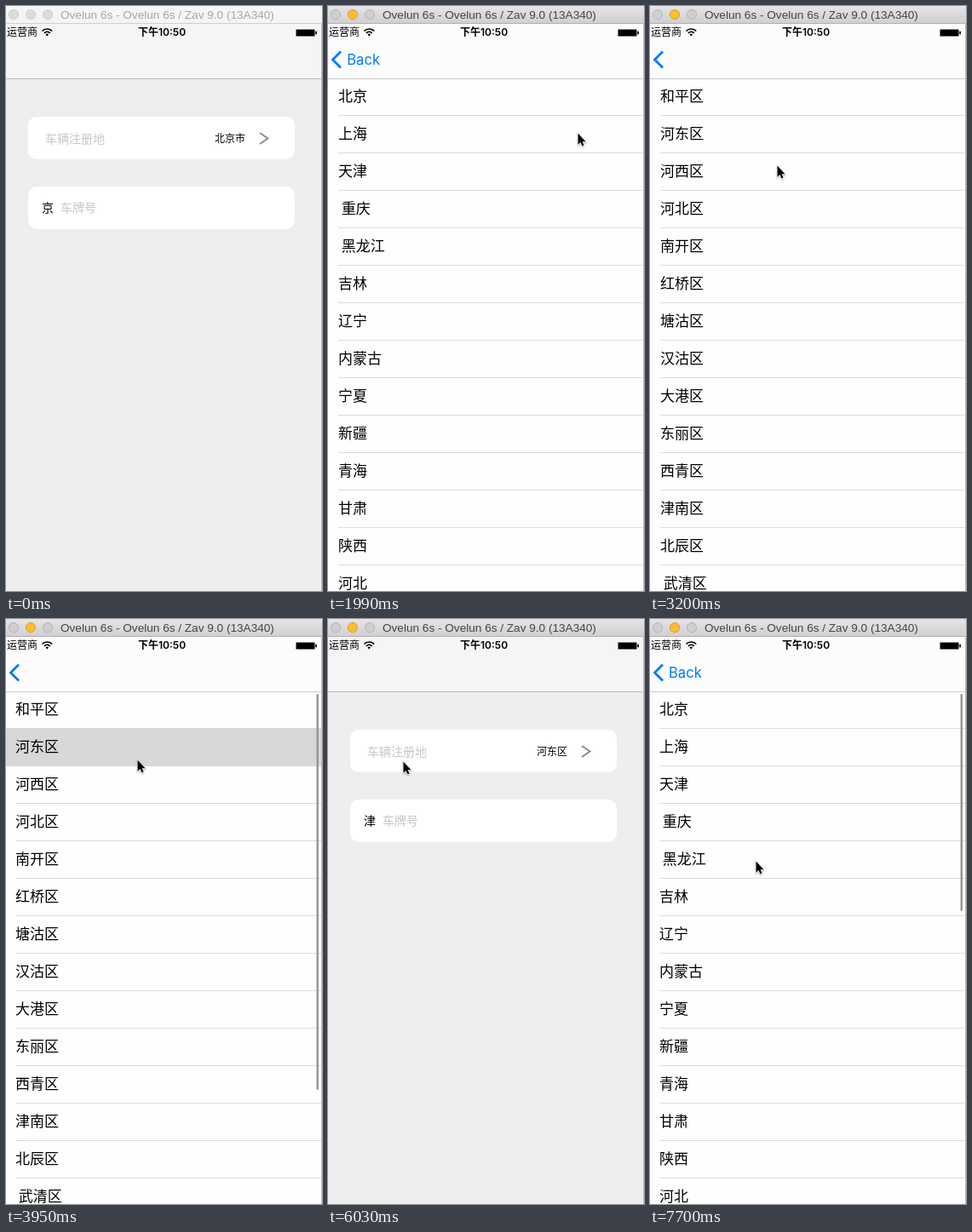
An HTML page with a canvas that plays this animation: 371x687 px, repeating every 8 s.

```html
<!DOCTYPE html>
<html lang="zh">
<head>
<meta charset="utf-8">
<style>
html, body { margin: 0; width: 100%; height: 100%; overflow: hidden; background: #eee; }
canvas { display: block; }
</style>
</head>
<body>
<canvas id="stage" width="371" height="687"></canvas>
<script>
const ctx = document.getElementById('stage').getContext('2d');
const W = 371, H = 687, LOOP = 8000;
const SCREEN_X = -4, SCREEN_W = 375, BAR_BOTTOM = 85, ROW = 44;
const BLUE = '#007aff';
const CJK = '"Noto Sans CJK SC", "Noto Sans CJK", sans-serif';
const UI = 'Inter, ' + CJK;

const provinces = ['北京', '上海', '天津', ' 重庆', ' 黑龙江', '吉林', '辽宁', '内蒙古',
  '宁夏', '新疆', '青海', '甘肃', '陕西', '河北'];
const districts = ['和平区', '河东区', '河西区', '河北区', '南开区', '红桥区', '塘沽区', '汉沽区',
  '大港区', '东丽区', '西青区', '津南区', '北辰区', ' 武清区'];

// Start times of the four navigation transitions
const OPEN = 1524, DRILL = 2757, POP = 3948, REOPEN = 6862;

// Pointer path: time, x, y
const pointer = [
  [540, 368, 139], [880, 293, 149], [2000, 293, 149], [2450, 145, 202], [2870, 145, 202],
  [3540, 154, 171], [3660, 154, 165], [4300, 154, 165], [4750, 89, 183], [5150, 60, 220],
  [5500, 34, 258], [5610, 28, 257], [6030, 88, 167], [6380, 221, 157], [6550, 256, 156],
  [7050, 256, 156], [7650, 123, 285], [7700, 124, 284]
];

const ramp = (t, a, b) => Math.min(1, Math.max(0, (t - a) / (b - a)));

// Critically damped spring from 0 to 1
function spring(ms) {
  const u = Math.max(0, ms) * 0.01826;
  return 1 - (1 + u) * Math.exp(-u);
}

function rect(x, y, w, h, color) {
  ctx.fillStyle = color;
  ctx.fillRect(x, y, w, h);
}

function roundRect(x, y, w, h, r, color) {
  ctx.fillStyle = color;
  ctx.beginPath();
  ctx.roundRect(x, y, w, h, r);
  ctx.fill();
}

// y is the visual middle of the line
function text(str, x, y, size, color = '#000', family = CJK, weight = 400) {
  ctx.font = `${weight} ${size}px ${family}`;
  ctx.fillStyle = color;
  ctx.fillText(str, x, Math.round(y + size * 0.37));
}

function polyline(points, color, width) {
  ctx.strokeStyle = color;
  ctx.lineWidth = width;
  ctx.beginPath();
  points.forEach(([x, y]) => ctx.lineTo(x, y));
  ctx.stroke();
}

function faded(alpha, draw) {
  if (alpha <= 0.005) return;
  ctx.save();
  ctx.globalAlpha = Math.min(1, alpha);
  draw();
  ctx.restore();
}

function form(x, city, plate) {
  ctx.save();
  ctx.translate(x - SCREEN_X, 0);
  rect(SCREEN_X, BAR_BOTTOM, SCREEN_W, H, '#eee');
  roundRect(26, 130, 313, 50, 10, '#fff');
  roundRect(26, 212, 313, 50, 10, '#fff');
  text('车辆注册地', 46, 155.5, 14, '#c7c7cb');
  text(city, 245, 155.5, 12);
  polyline([[298, 149], [307.5, 155.5], [298, 162]], '#858585', 1.8);
  text(plate, 42, 236.5, 14);
  text('车牌号', 64, 236.5, 14, '#c7c7cb');
  ctx.restore();
}

function list(x, rows, selected, indicatorH, indicatorAlpha) {
  rect(x, BAR_BOTTOM, SCREEN_W, H, '#fefefe');
  rows.forEach((name, i) => {
    const top = BAR_BOTTOM - 1 + i * ROW;
    if (i === selected) rect(x, top, SCREEN_W, ROW + 1, '#d8d8d8');
    text(name, x + 15, top + 22, 17);
    if (i !== selected) rect(x + 15, top + ROW, SCREEN_W, 1, '#dcdcde');
  });
  faded(indicatorAlpha, () => roundRect(x + 368.5, 88, 2.5, indicatorH, 1.2, '#979797'));
}

// Dims the screen below and casts the edge shadow of the sheet at x
function cover(x, p) {
  rect(0, BAR_BOTTOM, W, H, `rgba(0,0,0,${0.1 * p})`);
  if (x <= 0) return;
  const g = ctx.createLinearGradient(x - 8, 0, x, 0);
  g.addColorStop(0, 'rgba(0,0,0,0)');
  g.addColorStop(0.4, 'rgba(0,0,0,.06)');
  g.addColorStop(1, 'rgba(0,0,0,.07)');
  faded(3 * p, () => rect(x - 8, BAR_BOTTOM, 8, H, g));
}

function bar(sheetX) {
  rect(0, 21, W, 64, '#f5f5f5');
  if (sheetX < W) rect(sheetX > 0 ? sheetX + 14 : 0, 21, W, 64, '#fcfcfc');
  rect(0, BAR_BOTTOM, W, 1, sheetX > 0 ? '#bababa' : '#cbcbcb');
}

const backArrow = alpha => faded(alpha, () =>
  polyline([[15, 53.5], [5.5, 63], [15, 72.5]], BLUE, 2.8));

const backLabel = (x, alpha) => faded(alpha, () => text('Back', x, 63, 16.6, BLUE, UI));

const sheetAt = p => Math.round(SCREEN_X + SCREEN_W * (1 - p));
const parallaxAt = p => Math.round(SCREEN_X - SCREEN_W * 0.3 * p);

function pushProvinces(t, start, city, plate, indicatorAlpha) {
  const p = spring(t - start), x = sheetAt(p);
  if (p < 0.999) form(parallaxAt(p), city, plate);
  cover(x, p);
  if (p > 0) list(x, provinces, -1, 255, indicatorAlpha);
  bar(p > 0 ? x : W);
  backArrow(p ** 3);
  backLabel(22 + 138 * (1 - p), p * (0.8 + 0.2 * p));
}

function pushDistricts(t) {
  const p = spring(t - DRILL), x = sheetAt(p);
  list(parallaxAt(p), provinces, t >= 2740 ? 2 : -1, 255, 0);
  cover(x, p);
  list(x, districts, t >= 3940 ? 1 : -1, 465, ramp(t, DRILL + 500, DRILL + 650));
  bar(SCREEN_X);
  backArrow(1);
  backLabel(22 - 60 * p, (1 - p) * (1 - p * 0.4));
  backLabel(22 + 182 * (1 - p), 2 * p * (1 - p));
}

function popToForm(t) {
  const p = spring(t - POP), x = sheetAt(1 - p);
  form(parallaxAt(1 - p), '河东区', '津');
  cover(x, 1 - p);
  if (p < 0.999) list(x, districts, 1, 465, 1 - p);
  bar(x);
  backArrow((1 - p) ** 2);
}

function screen(t) {
  if (t < 2740) {
    const indicator = ramp(t, OPEN + 500, OPEN + 630) * (1 - ramp(t, 2220, 2450));
    pushProvinces(t, OPEN, '北京市', '京', indicator);
  } else if (t < 3960) pushDistricts(t);
  else if (t < REOPEN) popToForm(t);
  else pushProvinces(t, REOPEN, '河东区', '津', ramp(t, REOPEN + 500, REOPEN + 650));
}

function statusBar() {
  text('运营商', 1, 31, 12);
  ctx.strokeStyle = '#000';
  ctx.lineWidth = 1.7;
  for (const r of [4.6, 8]) {
    ctx.beginPath();
    ctx.arc(48.3, 35, r, -Math.PI * 0.76, -Math.PI * 0.24);
    ctx.stroke();
  }
  ctx.fillStyle = '#000';
  ctx.beginPath();
  ctx.moveTo(48.3, 35.5);
  ctx.arc(48.3, 35, 2.3, -Math.PI * 0.78, -Math.PI * 0.22);
  ctx.fill();
  text('下午10:50', 155, 31, 12, '#000', UI, 600);
  roundRect(340, 27, 23, 9, 1.5, '#808080');
  rect(341, 28, 21, 7, '#000');
  roundRect(363.3, 29.5, 1.6, 4, 0.8, '#000');
}

function titleBar(active) {
  const g = ctx.createLinearGradient(0, 0, 0, 20);
  g.addColorStop(0, active ? '#e6e4e6' : '#f6f6f6');
  g.addColorStop(1, active ? '#d1cfd1' : '#f4f4f4');
  rect(0, 0, W, 20, g);
  rect(0, 20, W, 1, active ? '#b3b1b3' : '#d0d0d0');
  [9, 29, 49].forEach((x, i) => {
    const lit = active && i === 1;
    ctx.fillStyle = lit ? '#fdbc34' : active ? '#d0ced0' : '#dcdcdc';
    ctx.strokeStyle = lit ? '#dfa023' : active ? '#b5b3b5' : '#cecece';
    ctx.lineWidth = 1;
    ctx.beginPath();
    ctx.arc(x, 10, 5.6, 0, Math.PI * 2);
    ctx.fill();
    ctx.stroke();
  });
  text('Ovelun 6s - Ovelun 6s / Zav 9.0 (13A340)', 64, 10.3, 13.6,
    active ? '#464446' : '#a6a6a6', '"Liberation Sans", sans-serif');
}

function arrow(t) {
  if (t < pointer[0][0]) return;
  let [, x, y] = pointer[pointer.length - 1];
  const i = pointer.findIndex(k => k[0] > t);
  if (i > 0) {
    const [t0, x0, y0] = pointer[i - 1], [t1, x1, y1] = pointer[i];
    const k = ramp(t, t0, t1);
    x = x0 + (x1 - x0) * k;
    y = y0 + (y1 - y0) * k;
  }
  ctx.save();
  ctx.translate(Math.round(x) + 0.5, Math.round(y) + 0.5);
  ctx.scale(0.88, 0.88);
  const shape = new Path2D('M0 0V15L3.4 11.8L5.6 17L8 16L5.8 11H10.3Z');
  ctx.shadowColor = 'rgba(0,0,0,.35)';
  ctx.shadowBlur = 2;
  ctx.shadowOffsetY = 1;
  ctx.strokeStyle = '#fff';
  ctx.lineWidth = 1.6;
  ctx.stroke(shape);
  ctx.shadowColor = 'transparent';
  ctx.fillStyle = '#000';
  ctx.fill(shape);
  ctx.restore();
}

function frame() {
  const t = performance.now() % LOOP;
  screen(t);
  statusBar();
  rect(370, 21, 1, H, '#bdbdbd');
  titleBar(t >= 1410);
  arrow(t);
  requestAnimationFrame(frame);
}
frame();
</script>
</body>
</html>
```
